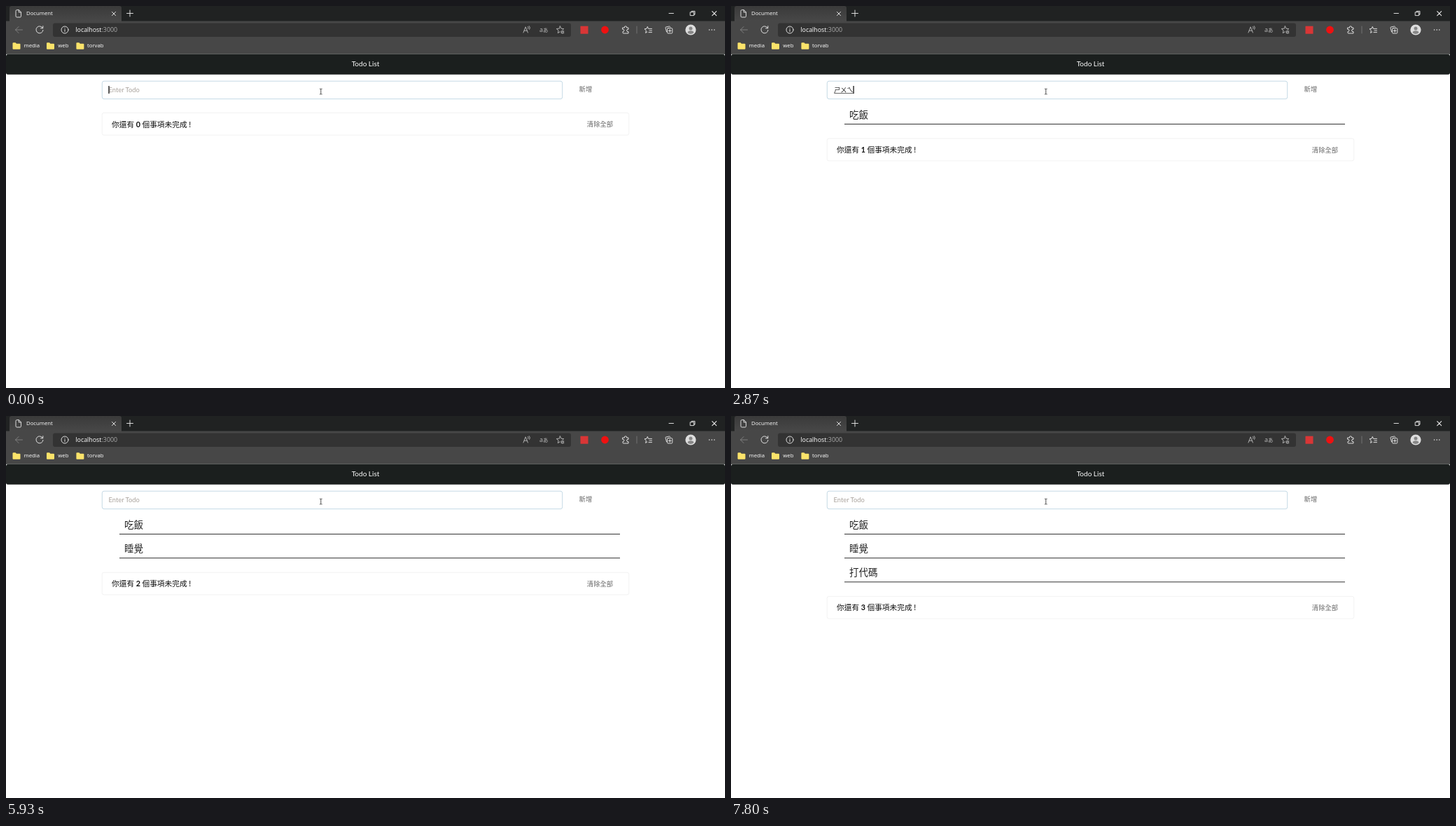
Recreate the animation shown at these times as an HTML page. Size 1027 px wide and 545 px high, loop 8000 ms.

```html
<!DOCTYPE html>
<html lang="zh-Hant">
<head>
<meta charset="utf-8">
<title>Todo List</title>
<style>
  html, body { margin: 0; width: 100%; height: 100%; overflow: hidden; background: #fff; }
  svg { display: block; }
  text { font-family: Lato, 'Noto Sans CJK TC', 'Noto Sans CJK', sans-serif; font-size: 9.36px; white-space: pre; }
  .ui text { font-family: 'Open Sans', 'Noto Sans', sans-serif; font-size: 7.75px; fill: #fff; }
  .line { fill: none; stroke: #eee; stroke-width: .9; stroke-linecap: round; stroke-linejoin: round; }
  .soft { fill: #666; }
  .item text { font-size: 13.5px; font-weight: 300; fill: #222; }
  .sum { font-size: 10.7px; font-weight: 500; fill: #111; }
  .sum tspan { font-weight: 700; }
</style>
</head>
<body>
<svg width="1027" height="545" viewBox="0 0 1027 545">
  <defs>
    <path id="folder" d="M0 1.2Q0 .3 1 .3H4L5.5 1.8H10Q11 1.8 11 2.8V8.7Q11 9.7 10 9.7H1Q0 9.7 0 8.7Z" fill="#fbe36a"/>
    <path id="star" d="M0-5.2 1.5-1.8 5.2-1.5 2.4 1 3.2 4.6 0 2.7-3.2 4.6-2.4 1-5.2-1.5-1.5-1.8Z"/>
    <path id="cross" d="M-2.6-2.6 2.6 2.6M2.6-2.6-2.6 2.6"/>
    <linearGradient id="tab" x2="0" y2="1">
      <stop stop-color="#3a3a3a"/><stop offset="1" stop-color="#484848"/>
    </linearGradient>
  </defs>

  <g class="ui">
    <rect width="1027" height="22" fill="#202222"/>
    <rect y="21.5" width="1027" height="47.5" fill="#474747"/>
    <path d="M5 22V3Q5 0 8 0H162Q165 0 165 3V22Z" fill="url(#tab)"/>
    <rect y="68" width="1027" height="1" fill="#5c5f5e"/>
    <rect x="67" y="24.5" width="740" height="19.5" rx="3" fill="#333"/>
    <text x="29" y="13.3">Document</text>
    <text x="99.3" y="37.2" style="font-size:8.9px">localhost<tspan fill="#aaa">:3000</tspan></text>
    <use href="#folder" x="9.5" y="52"/><text x="25.5" y="59.3">media</text>
    <use href="#folder" x="58" y="52"/><text x="74.3" y="59.3">web</text>
    <use href="#folder" x="100.4" y="52"/><text x="116" y="59.3">torvab</text>

    <g class="line">
      <path d="M14 7Q14 5.6 15.4 5.6H18.4L21.5 8.8V14.6Q21.5 16 20.1 16H15.4Q14 16 14 14.6ZM18.2 5.8V9H21.3"/>
      <use href="#cross" x="154" y="11"/>
      <path d="M172.5 10.5H181.5M177 6V15M947 10.5H953.5"/>
      <path d="M977.6 8.8H982.6V13.6H977.6ZM979.2 8.6V7.4H984V12.2H982.8"/>
      <use href="#cross" x="1011.7" y="10.6" transform="translate(1011.7 10.6) scale(1.15) translate(-1011.7 -10.6)"/>
      <path d="M23.5 34H13.5M18 29.5 13.5 34 18 38.5" stroke="#858585"/>
      <path d="M52.4 31.4A5 5 0 1 0 53 34.4M52.8 28.6V31.8H49.6"/>
      <circle cx="84" cy="34" r="5"/>
      <path d="M84 33.4V36.5M84 31.4V31.6"/>
      <g stroke="#bbb">
        <path d="M739 38 742.2 29.8 745.4 38M740.2 35.2H744.2M745.6 29.4Q746.8 30.8 745.8 32.4M747.4 28.6Q749.4 30.8 747.7 33.4"/>
        <use href="#star" x="791.5" y="34"/>
        <circle cx="795" cy="37.2" r="2.8" fill="#bbb" stroke="#333"/>
        <path d="M793.6 37.2H796.4M795 35.8V38.6" stroke="#333" stroke-width=".7"/>
      </g>
      <path d="M881 31H883.4Q883 28.8 885 28.8T886.6 31H889V33.3Q886.6 33 886.6 35T889 36.6V39H882Q881 39 881 38V36.5Q883 36.5 883 34.8T881 33.2Z"/>
      <path d="M901 29V39" stroke="#777"/>
      <path d="M915.8 37 913.6 38.4 914.4 35 912 32.7 915 32.4 916.3 29.4 917.6 32.4H922.5M919 35H922.5M918 37.6H922.5"/>
      <path d="M943.5 36.8 942 31.2Q941.8 30.2 942.8 30L947.6 29Q948.5 29 948.8 30"/>
      <rect x="944.6" y="31.6" width="7.2" height="7.4" rx="1.2"/>
      <path d="M948.2 33.4V37.2M946.3 35.3H950.1"/>
    </g>
    <text x="762" y="36.8" style="font-size:9px;fill:#bbb">a<tspan style="font-family:'Noto Sans CJK TC','Noto Sans CJK',sans-serif;font-size:7.4px">あ</tspan></text>
    <rect x="820.5" y="28.7" width="11" height="11" fill="#d93636"/>
    <circle cx="855.5" cy="34" r="5.4" fill="#ee1111"/>
    <circle cx="978" cy="34" r="7.6" fill="#dedede"/>
    <path d="M973.6 38.3Q973.6 35.2 978 35.2T982.4 38.3Q980.5 40 978 40T973.6 38.3Z" fill="#888"/>
    <circle cx="978" cy="32" r="2.5" fill="#888"/>
    <g fill="#eee"><circle cx="1004.6" cy="34" r=".8"/><circle cx="1008.2" cy="34" r=".8"/><circle cx="1011.8" cy="34" r=".8"/></g>
  </g>

  <rect y="69" width="1027" height="28.7" rx="2.7" fill="#1b1f1e"/>
  <text x="513.5" y="86.4" text-anchor="middle" fill="#fff" style="font-size:10px">Todo List</text>

  <rect x="137.3" y="107.2" width="657.4" height="25.4" rx="2.7" fill="#fff" stroke="#b5d0df" stroke-width=".8"/>
  <text id="hint" x="146.6" y="122.7" fill="#aaa39d">Enter Todo</text>
  <text id="typed" x="146.9" y="122.6" fill="#222"></text>
  <rect id="under" x="147.3" y="124" height=".8" fill="#444"/>
  <rect id="caret" y="114" width="1.2" height="11" fill="#000"/>
  <path d="M448 118.2H449.3L449.8 118.7 450.3 118.2H451.6M449.8 118.7V125.4M448 125.9H449.3L449.8 125.4 450.3 125.9H451.6" fill="none" stroke="#222" stroke-width=".8"/>
  <text class="soft" x="818.6" y="122.3">新增</text>

  <g id="items"></g>

  <g id="foot">
    <rect x="137.2" y="152.4" width="752.6" height="31.8" rx="2.7" fill="#fff" stroke="#ececec" stroke-width=".7"/>
    <text class="sum" x="151" y="172.5">你還有<tspan id="count"> 0 </tspan>個事項未完成 !</text>
    <text class="soft" x="829.8" y="172.4">清除全部</text>
  </g>
</svg>
<script>
  const LOOP = 8000, CHAR = 9.36;
  const $ = id => document.getElementById(id);

  $('items').innerHTML = ['吃飯', '睡覺', '打代碼'].map((name, i) =>
    `<g class="item" transform="translate(0 ${i * 34.15})">
      <text x="169" y="160">${name}</text>
      <rect x="162" y="168" width="715" height="1" fill="#333"/>
    </g>`).join('');
  const items = [...$('items').children];

  // time, text, composing, items added, caret shown
  const steps = [
    [0, '', 0, 0, 1], [70, '', 0, 0, 0], [600, '', 0, 0, 1],
    [770, 'ㄔ', 1, 0, 1], [970, '吃', 1, 0, 1], [1130, '吃ㄈ', 1, 0, 1],
    [1270, '吃ㄈㄢ', 1, 0, 1], [1430, '吃飯', 1, 0, 1], [1600, '吃飯', 0, 0, 1],
    [2070, '', 0, 1, 0], [2530, 'ㄕ', 1, 1, 1], [2700, 'ㄕㄨ', 1, 1, 1],
    [2830, 'ㄕㄨㄟ', 1, 1, 1], [3230, '睡', 1, 1, 1], [3500, '睡ㄐ', 1, 1, 1],
    [3870, '睡ㄐㄧ', 1, 1, 1], [4030, '睡ㄐㄧㄠ', 1, 1, 1], [4230, '睡覺', 1, 1, 1],
    [4500, '睡覺', 0, 1, 1], [4870, '睡覺', 0, 1, 0],
    [5070, '', 0, 2, 0], [5370, '', 0, 2, 1], [5930, '', 0, 2, 0],
    [6000, 'ㄉ', 1, 2, 1], [6130, 'ㄉㄚ', 1, 2, 1], [6230, '打', 1, 2, 1],
    [6330, '打ㄉ', 1, 2, 1], [6430, '打ㄉㄞ', 1, 2, 1], [6560, '打代', 1, 2, 1],
    [6770, '打代ㄇ', 1, 2, 1], [6870, '打代ㄇㄚ', 1, 2, 1], [7000, '打代碼', 1, 2, 1],
    [7170, '打代碼', 0, 2, 1], [7700, '', 0, 3, 0]
  ];

  const show = (el, on) => el.setAttribute('visibility', on ? 'visible' : 'hidden');
  let last;

  function draw(now) {
    const t = now % LOOP;
    const step = steps.findLast(s => s[0] <= t);
    if (step !== last) {
      const [, text, composing, added, caret] = last = step;
      const width = text.length * CHAR;
      $('typed').textContent = text;
      show($('hint'), !text);
      show($('under'), composing);
      $('under').setAttribute('width', Math.max(0, width - .6));
      show($('caret'), caret);
      $('caret').setAttribute('x', 146.4 + width);
      items.forEach((el, i) => show(el, i < added));
      $('count').textContent = ` ${added} `;
      $('foot').setAttribute('transform', `translate(0 ${added ? 2.5 + added * 34.15 : 0})`);
    }
  }

  const start = performance.now();
  function frame() {
    draw(performance.now() - start);
    requestAnimationFrame(frame);
  }
  frame();
</script>
</body>
</html>
```
